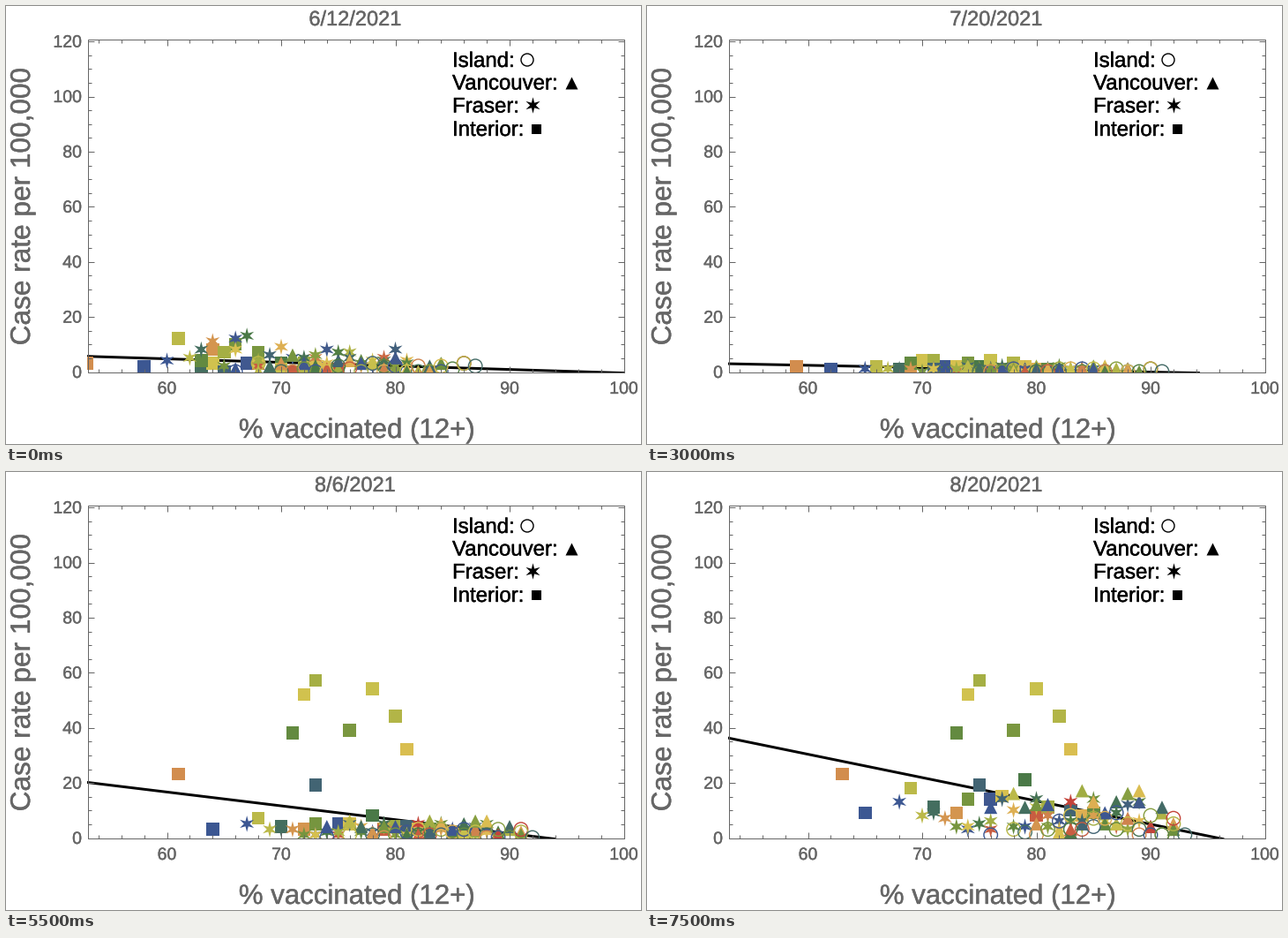
Recreate the animation shown at these times as a matplotlib script. Size 720 px wide and 496 px high, loop 8000 ms.

```python
import numpy as np
import matplotlib.pyplot as plt
from matplotlib import patheffects
from matplotlib.animation import FuncAnimation
from matplotlib.colors import LinearSegmentedColormap
from matplotlib.patches import Rectangle
from matplotlib.path import Path

W, H, DPI = 720, 496, 100
PT = 72 / DPI                      # points per pixel
LEFT, RIGHT, TOP, BOTTOM = 93, 701, 37.6, 414.6
GRAY = "#666666"
plt.rcParams["font.family"] = "Liberation Sans"

RAINBOW = LinearSegmentedColormap.from_list("rainbow", [
    "#3c5792", "#41588e", "#436c62", "#4a7a45", "#6a8e3e",
    "#9fac43", "#cfc34d", "#e0ba53", "#cf844d", "#c23636"])

DATES = ["6/12", "6/23", "7/5", "7/9", "7/13", "7/16", "7/20", "7/23",
         "7/27", "7/30", "8/3", "8/6", "8/10", "8/13", "8/17", "8/20"]
LAST = len(DATES) - 1

# Interior areas with the large outbreak: hue, last coverage, peak rate
OUTBREAKS = [(.87, 63, 29), (.68, 74, 66), (.57, 75, 72),
             (.42, 73, 48), (.48, 78, 50), (.65, 80, 68),
             (.6, 82, 56), (.73, 83, 41), (.18, 75, 24)]

rng = np.random.default_rng(8)


def px(v):
    return 182.5 + 12.95 * (np.asarray(v) - 60)


def py(v):
    return 414 - 3.12 * np.asarray(v)


def fade(i):
    """Decline of the spring wave."""
    return np.exp(-i / 1.5)


def ramp(i):
    """Slow summer rise, 1 at the last step."""
    return np.exp((i - LAST) / 4)


def wave(i):
    """Outbreak that peaks shortly before the end."""
    return np.exp(-((i - 13) / 4.1) ** 2)


def skewed(n, lo, hi):
    return lo + (hi - lo) * rng.uniform(size=n) ** 1.8


class Areas:
    def __init__(self, hue, start, end, first, last, curve=ramp):
        self.color = RAINBOW(hue)
        self.start, self.end = start, end
        self.first, self.last, self.curve = first, last, curve

    def at(self, i):
        x = self.start + (self.end - self.start) * (i / LAST) ** .55
        y = self.first * fade(i) + self.last * self.curve(i)
        return np.c_[px(np.round(x)), py(np.round(y))]


def spread(n, start, end, first, last):
    """n areas along a coverage range, denser towards its upper end."""
    k = np.arange(n)
    u = (k / (n - 1)) ** .7
    return Areas(k * .618 % 1, np.round(start[0] + u * (start[1] - start[0])),
                 np.round(end[0] + u * (end[1] - end[0])),
                 skewed(n, *first), skewed(n, *last))


def outbreaks():
    hue, end, peak = np.array(OUTBREAKS).T
    return Areas(hue, end - 10, end, skewed(len(hue), 0, 16), peak, wave)


def star(n=6, inner=.36):
    k = np.arange(2 * n + 1)
    a = k * np.pi / n + np.pi / 2
    r = np.where(k % 2, inner, 1)
    return Path(np.c_[r * np.cos(a), r * np.sin(a)], closed=True)


fig = plt.figure(figsize=(W / DPI, H / DPI), dpi=DPI, facecolor="white")
ax = fig.add_axes([0, 0, 1, 1])
ax.set(xlim=(0, W), ylim=(H, 0))
ax.axis("off")


def label(x, y, s, size, color=GRAY, **kw):
    kw = {"ha": "center", "va": "baseline", **kw}
    weight = patheffects.withStroke(linewidth=.4 * PT, foreground=color)
    return ax.text(x, y, s, fontsize=size * PT, color=color,
                   path_effects=[weight], **kw)


def segment(xs, ys):
    ax.plot(xs, ys, color=GRAY, lw=PT, zorder=8, solid_capstyle="butt")


def marks(xy, marker, size, colors, **kw):
    x, y = np.transpose(xy)
    style = dict(marker=marker, s=(size * PT) ** 2, **kw)
    if marker == "o":
        return ax.scatter(x, y, facecolors="none", edgecolors=colors,
                          linewidths=1.4 * PT, **style)
    return ax.scatter(x, y, c=colors, linewidths=0, **style)


def clip(artist):
    artist.set_clip_path(Rectangle((LEFT - 1, TOP), RIGHT - LEFT + 2,
                                   BOTTOM + 1 - TOP, transform=ax.transData))


# Frame, ticks and labels
ax.add_patch(Rectangle((LEFT, TOP), RIGHT - LEFT, BOTTOM - TOP, fill=False,
                       ec=GRAY, lw=PT, zorder=8))
for v in range(54, 101, 2):
    n = 7 if v % 10 == 0 else 4
    segment([px(v)] * 2, [BOTTOM, BOTTOM - n])
    segment([px(v)] * 2, [TOP, TOP + n])
    if v % 10 == 0:
        label(px(v), 439, str(v), 19.5)
for v in range(0, 121, 5):
    n = 7 if v % 20 == 0 else 4
    y = py(v) + .6
    segment([LEFT, LEFT + n], [y, y])
    segment([RIGHT, RIGHT - n], [y, y])
    if v % 20 == 0:
        label(86, y + 6.4, str(v), 19.5, ha="right")
label(397.5, 489, "% vaccinated (12+)", 31.2)
label(27, 227, "Case rate per 100,000", 31.6, rotation=90,
      rotation_mode="anchor")
title = label(396, 22, "", 23.6)

# Legend
for name, y, marker, spot, size in [
        ("Island:", 69, "o", (591, 61), 14),
        ("Vancouver:", 94.5, "^", (641, 87), 14),
        ("Fraser:", 120.5, star(), (596.5, 111.5), 18.5),
        ("Interior:", 147, "s", (601, 138.5), 11)]:
    label(506, y, name, 24, "black", ha="left")
    marks([spot], marker, size, ["black"], zorder=9)

# Data layers
fit, = ax.plot([], [], color="black", lw=3 * PT, zorder=2)
clip(fit)
layers = []
for z, (areas, marker, size) in enumerate([
        (spread(13, (58, 75), (65, 85), (0, 12), (8, 23)), "s", 14.5),
        (outbreaks(), "s", 14.5),
        (spread(34, (60, 81), (68, 89), (2, 13), (3, 15)), star(), 18.5),
        (spread(26, (66, 84), (76, 92), (0, 6), (2, 18)), "^", 15),
        (spread(24, (66, 87), (76, 93), (0, 3), (1, 9)), "o", 15.5)],
        start=3):
    dots = marks(areas.at(0), marker, size, areas.color, zorder=z)
    clip(dots)
    layers.append((dots, areas))


def fit_line(i):
    rate = 1.5 + 4 * fade(i) + 37 / (1 + np.exp((11 - i) / 1.5))
    end = np.interp(i, [0, 1, 2, 5, 7, 10, 12, 14, 15],
                    [700, 701, 595, 592, 659, 621, 624, 661, 653])
    return [LEFT, end], [py(rate), BOTTOM + 1]


def draw(i):
    title.set_text(DATES[i] + "/2021")
    fit.set_data(*fit_line(i))
    for dots, areas in layers:
        dots.set_offsets(areas.at(i))
    return [title, fit] + [dots for dots, _ in layers]


anim = FuncAnimation(fig, draw, frames=len(DATES), interval=500,
                     repeat=True, repeat_delay=0, blit=False)
plt.show()
```
